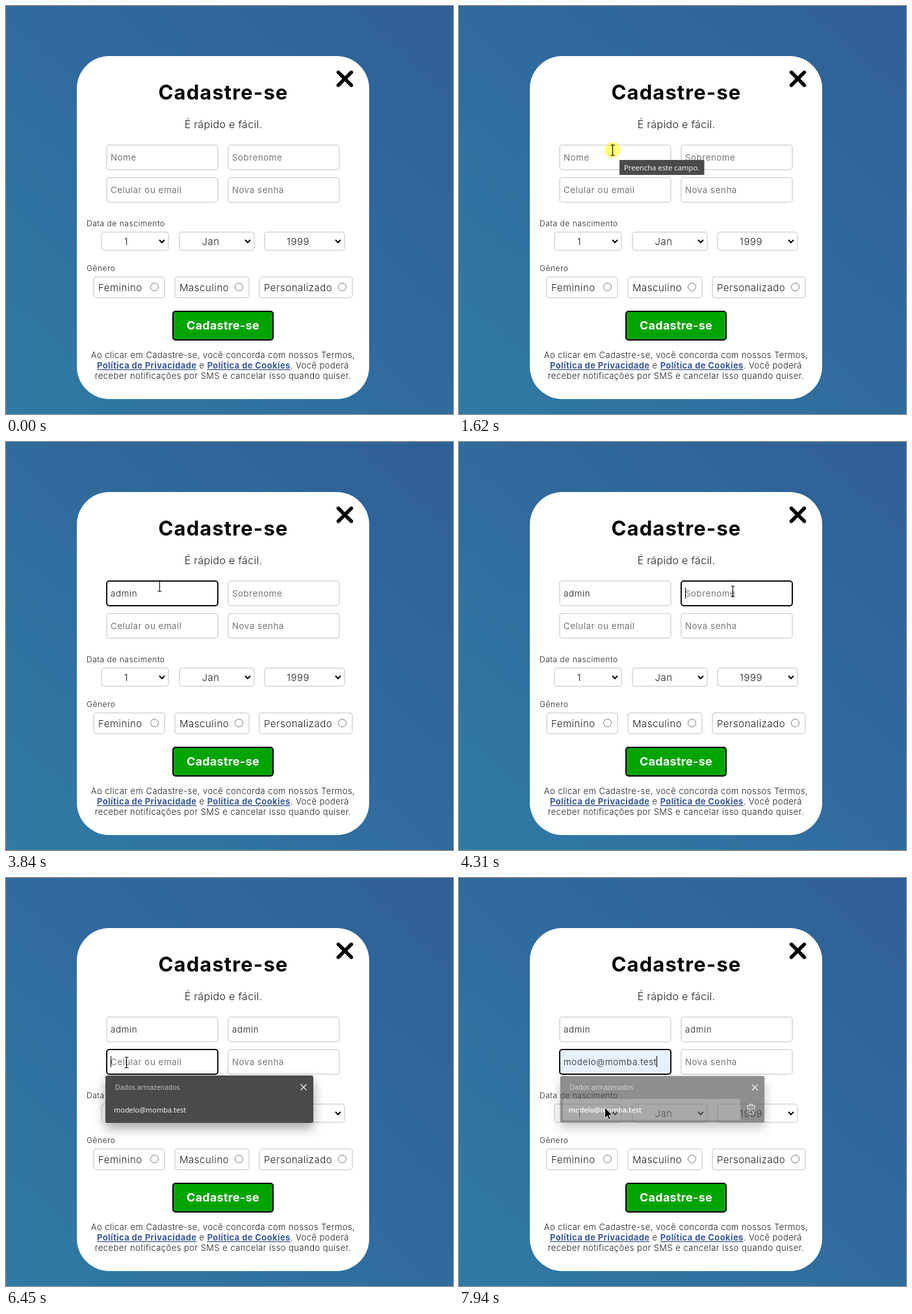
Recreate the animation shown at these times as an HTML page. Size 688x628 px, loop 8000 ms.

```html
<!DOCTYPE html>
<html lang="pt-BR">
<head>
<meta charset="utf-8">
<title>Cadastro</title>
<style>
  html, body { margin: 0; width: 100%; height: 100%; overflow: hidden; background: #30699c; }
  svg { display: block; width: 688px; height: 628px; }
  text { font-family: Montserrat, Inter, sans-serif; fill: #1c1e21; white-space: pre; }
  .mid { text-anchor: middle; }
  .title { font-size: 31px; font-weight: 700; letter-spacing: .035em; fill: #000; }
  .sub { font-size: 16px; font-weight: 300; letter-spacing: .02em; }
  .label { font-size: 12px; font-weight: 300; letter-spacing: .045em; }
  .option { font-size: 15px; font-weight: 300; letter-spacing: .035em; }
  .field { font-size: 13.33px; font-weight: 300; letter-spacing: .05em; }
  .field.empty { fill: #757575; font-weight: 400; letter-spacing: .04em; }
  .field.preview { font-family: "Liberation Sans", Arial, sans-serif; font-weight: 400; letter-spacing: 0; fill: #000; }
  .legal { font-size: 13px; font-weight: 300; letter-spacing: .035em; }
  .link { font-weight: 700; letter-spacing: .03em; fill: #385898; text-decoration: underline; }
  .submit { font-size: 18px; font-weight: 700; letter-spacing: .015em; fill: #fff; }
  .box { fill: #fff; stroke: #dddfe2; stroke-width: 2; }
  .box.focus { stroke: #101010; }
  .box.filled { fill: #e8f0fe; }
  .radio { fill: #fff; stroke: #767676; }
  .line { fill: none; stroke: #000; stroke-width: 2; }
  .ui { font-family: "Open Sans", "Noto Sans", sans-serif; font-size: 11.3px; fill: #fff; }
  .ui.head { font-size: 10.4px; fill: #c8c8c8; }
  .thin { fill: none; stroke: #d8d8d8; stroke-width: 1.1; }
  #panel { filter: drop-shadow(0 8px 9px rgba(0, 0, 0, .36)); }
</style>
</head>
<body>
<svg viewBox="0 0 688 628">
  <defs>
    <linearGradient id="sky" x1="1" y1="0" x2="0" y2="1">
      <stop offset="0" stop-color="#2f5f96"/>
      <stop offset=".5" stop-color="#306b9d"/>
      <stop offset="1" stop-color="#2f7ba5"/>
    </linearGradient>
  </defs>
  <rect width="688" height="628" fill="url(#sky)"/>
  <rect x="109" y="77" width="450" height="528" rx="50" fill="#fff"/>
  <path d="M511.5 102l20 20m0-20l-20 20" class="line" style="stroke-width:5.4;stroke-linecap:round"/>
  <text class="mid title" x="334.5" y="144">Cadastre-se</text>
  <text class="mid sub" x="334.5" y="188">É rápido e fácil.</text>

  <g id="form"></g>

  <text class="label" x="124" y="339">Data de nascimento</text>
  <text class="label" x="124" y="408">Gênero</text>
  <rect x="257" y="470" width="154" height="44" rx="4" fill="#00a400" stroke="#000" stroke-width="2"/>
  <text class="mid submit" x="334" y="498">Cadastre-se</text>
  <text class="mid legal" x="334" y="542">Ao clicar em Cadastre-se, você concorda com nossos Termos,</text>
  <text class="mid legal" x="334" y="558"><tspan class="link">Política de Privacidade</tspan> e <tspan class="link">Política de Cookies</tspan>. Você poderá</text>
  <text class="mid legal" x="334" y="574">receber notificações por SMS e cancelar isso quando quiser.</text>

  <rect id="caret" y="224" width="1" height="17"/>

  <g id="tooltip">
    <rect x="247" y="237" width="130.5" height="23" fill="#4a4a4a"/>
    <text class="ui" x="254" y="253">Preencha este campo.</text>
  </g>

  <g id="popup">
    <rect id="panel" x="153" y="304" width="320" height="73" rx="3" fill="#4a4a4a"/>
    <text class="ui head" x="168" y="326">Dados armazenados</text>
    <path class="thin" style="stroke:#fff" d="M453.5 317.5l9 9m0-9l-9 9"/>
    <g id="hover">
      <rect x="157" y="340" width="278" height="33" rx="2" fill="#757575"/>
      <path class="thin" d="M445 350.5h14M449.5 350.5v-2h5v2M446.5 350.5l1 13h9l1-13M450.3 353.5v7M453.7 353.5v7"/>
    </g>
    <text id="saved" class="ui" style="font-size:11px" x="166" y="361"></text>
  </g>

  <circle id="click" r="12" fill="#ffff00" fill-opacity=".55" />
  <path id="arrow" d="M0 0v16l3.7-3.5 2.5 5.8 2.5-1.1-2.5-5.6h5.3z" stroke="#fff" stroke-width=".8"/>
  <path id="beam" d="M-3 -7.5h2.5l.5 .5l.5-.5h2.5M0 -7v15M-3 8.5h2.5l.5-.5l.5 .5h2.5" fill="none" stroke="#000" stroke-width="1.1"/>
</svg>
<script>
const LOOP = 8000, BLINK = 530;
const EMAIL = 'modelo@momba.test';
const $ = id => document.getElementById(id);

const box = (x, y, w, h, attrs = '') =>
  `<rect class="box" x="${x}" y="${y}" width="${w}" height="${h}" rx="4" ${attrs}/>`;

const fields = [
  { x: 155, y: 214, hint: 'Nome', typed: [2420, 2770, 2910, 3040, 3240], focus: [1690, 4310] },
  { x: 342, y: 214, hint: 'Sobrenome', typed: [4640, 4840, 4910, 5110, 5310], focus: [4310, 6374] },
  { x: 155, y: 264, hint: 'Celular ou email', typed: [], focus: [6374, LOOP] },
  { x: 342, y: 264, hint: 'Nova senha', typed: [], focus: [LOOP, LOOP] }
];
const selects = [[147, 103, '1', 185, 240], [267, 115, 'Jan', 315, 372], [398, 123, '1999', 449.5, 511]];
const genders = [[135, 109, 'Feminino', 228.5], [260, 114, 'Masculino', 358.5], [390, 143, 'Personalizado', 517.5]];

$('form').innerHTML =
  fields.map((f, i) => box(f.x, f.y, 171, 38, `id="box${i}"`) +
    `<text id="text${i}" x="${f.x + 6}" y="${f.y + 24}"></text>`).join('') +
  selects.map(([x, w, label, cx, arrow]) => box(x, 348, w, 28) +
    `<text class="mid option" x="${cx}" y="368">${label}</text>` +
    `<path class="line" d="M${arrow - 4} 360l4 4 4-4"/>`).join('') +
  genders.map(([x, w, label, cx]) => box(x, 417, w, 32) +
    `<text class="option" x="${x + 7}" y="439">${label}</text>` +
    `<circle class="radio" cx="${cx}" cy="432.5" r="6"/>`).join('');
$('saved').textContent = EMAIL;

// Pointer moves: start, step length, step count, from, to
const moves = [
  [390, 69, 12, [640, 682], [236.5, 221.5]],
  [3847, 77, 5, [236.5, 221.5], [421.5, 229.5]],
  [5916, 76, 5, [421.5, 229.5], [185.5, 283.5]],
  [7330, 65, 5, [185.5, 283.5], [224.5, 353.5]]
];
const clicks = [[1620, 1690], [4233, 4310], [6297, 6374], [7800, 7870]];
const resets = [1690, 4310, 6374, 6470, 7460, 7870, ...fields.flatMap(f => f.typed)];

const within = (t, [a, b]) => t >= a && t < b;
const show = (id, on) => $(id).setAttribute('visibility', on ? 'visible' : 'hidden');
const fade = (id, value) => $(id).setAttribute('opacity', value);

function pointerAt(t) {
  const move = moves.filter(m => t >= m[0]).pop();
  if (!move) return null;
  const [start, step, count, from, to] = move;
  const p = Math.min(1, (Math.floor((t - start) / step) + 1) / count);
  const eased = Math.sin(p * Math.PI / 2);
  return from.map((v, i) => v + (to[i] - v) * eased);
}

function fieldValue(f, i, t, hovering) {
  if (i === 2 && (t >= 7870 || hovering)) return EMAIL;
  return 'admin'.slice(0, f.typed.filter(at => t >= at).length);
}

function drawPointer(t, pos) {
  const overField = pos && fields.some(f =>
    pos[0] > f.x && pos[0] < f.x + 171 && pos[1] > f.y && pos[1] < f.y + 38);
  show('arrow', pos && !overField);
  show('beam', pos && overField);
  show('click', clicks.some(c => within(t, c)));
  if (!pos) return;
  for (const id of ['arrow', 'beam', 'click']) $(id).setAttribute('transform', `translate(${pos})`);
}

function drawFields(t, hovering) {
  const lastReset = Math.max(...resets.filter(at => at <= t), -LOOP);
  show('caret', t - lastReset < BLINK);
  fields.forEach((f, i) => {
    const value = fieldValue(f, i, t, hovering);
    const focused = within(t, f.focus);
    const preview = i === 2 && value && t < 7870;
    const text = $('text' + i);
    text.textContent = value || f.hint;
    text.setAttribute('class', 'field' + (value ? preview ? ' preview' : '' : ' empty'));
    $('box' + i).setAttribute('class', 'box' + (focused ? ' focus' : '') + (i === 2 && value ? ' filled' : ''));
    if (focused) {
      const width = value && !preview ? text.getComputedTextLength() : 0;
      $('caret').setAttribute('x', Math.round(f.x + 6 + width));
      $('caret').setAttribute('y', f.y + 10);
    }
  });
}

function drawPopup(t, hovering) {
  const opacity = t < 6374 ? 0 : t < 6450 ? .5 : t < 7870 ? 1 : t < 7940 ? .85 : .62;
  const scale = opacity === 1 ? 1 : .97 + .02 * opacity;
  fade('popup', opacity);
  $('popup').setAttribute('transform', `translate(313 340.5) scale(${scale}) translate(-313 -340.5)`);
  fade('hover', hovering ? 1 : 0);
  $('saved').setAttribute('font-weight', hovering ? 600 : 400);
}

function draw(now) {
  const t = now % LOOP;
  const pos = pointerAt(t);
  const hovering = t >= 7330 && pos[1] > 338;
  drawFields(t, hovering);
  drawPopup(t, hovering);
  fade('tooltip', within(t, [1420, 1690]) ? (t < 1480 ? .5 : 1) : 0);
  drawPointer(t, pos);
}

const began = performance.now();
(function tick() {
  draw(performance.now() - began);
  requestAnimationFrame(tick);
})();
</script>
</body>
</html>
```
